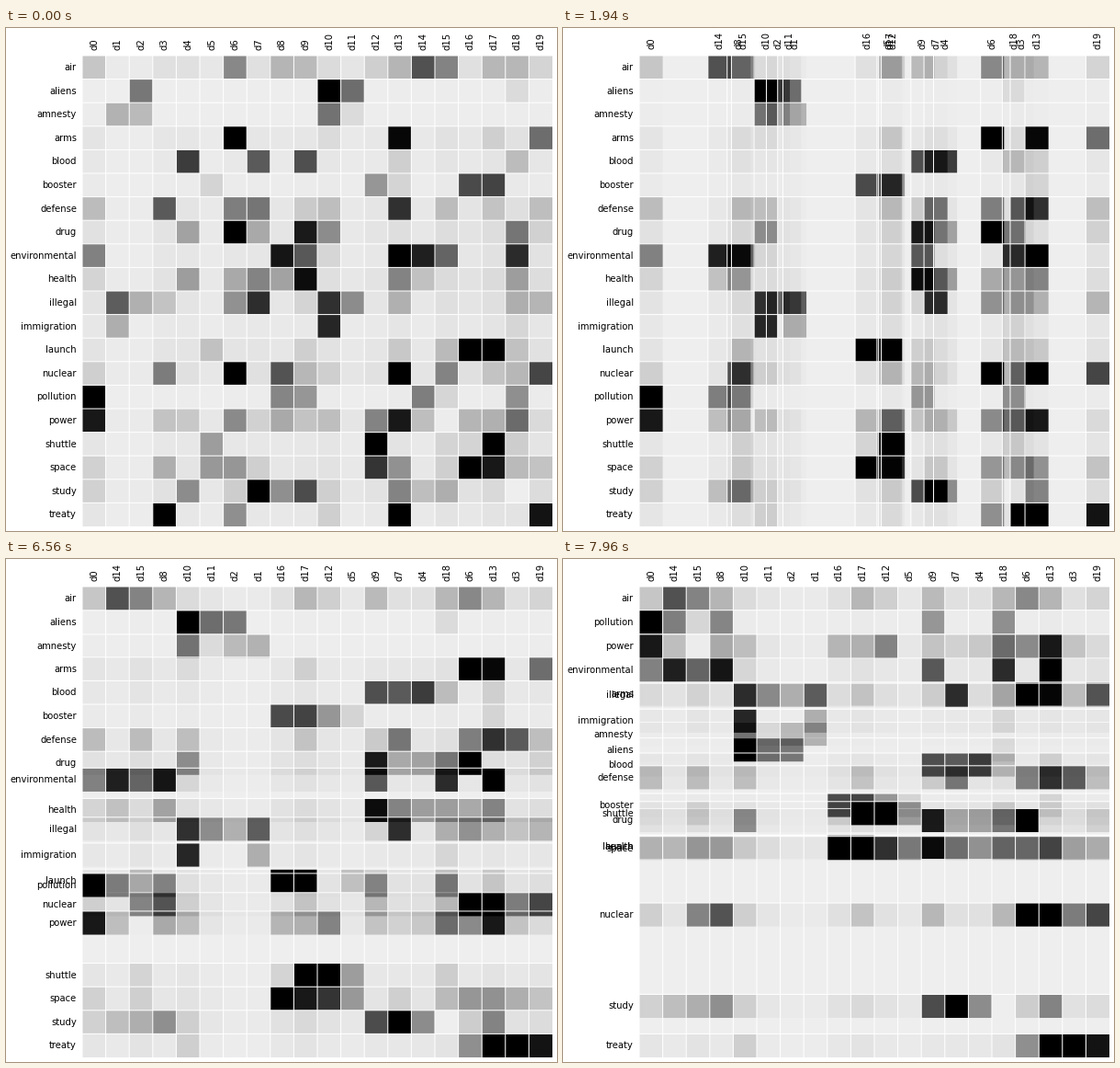
Write a matplotlib script that moves like this. It is 600 px wide and 547 px high and loops after 8 s.

```python
import numpy as np
import matplotlib.pyplot as plt
from matplotlib.animation import FuncAnimation

W, H, DPI = 600, 547, 64
LEFT, TOP, SIDE, N = 83, 30, 512, 20
BAND = SIDE / N
PAPER = 238 / 255
STEP, LOOP = 20, 8000

# Timing in ms: start, first drawn change, length of one move
COL_START, COL_FIRST, COL_LABELS_END = 465, 500, 3050
ROW_START, ROW_FIRST, ROW_DELAY = 5746, 6040, 91
MOVE = 2212

plt.rcParams["font.family"] = "DejaVu Sans"

# How strongly each document picks up the faint background of a term
reach = np.array([1.2, .3, .3, 1, 1, .5, 1, 1, .8, 1,
                  1.3, .6, .9, 1.5, .7, 1.6, 1, 1.6, 1.6, 1.4])
names, weights = [], []


def term(name, faint, **docs):
    """Add a matrix row: a faint base level and its notable cells, in percent."""
    line = faint * reach
    for doc, value in docs.items():
        line[int(doc[1:])] = value
    names.append(name)
    weights.append(line / 100)


term("air", 6, d0=17, d6=43, d8=24, d9=22, d12=13, d13=24, d14=66, d15=45,
     d17=23, d18=23, d19=11)
term("aliens", .5, d2=50, d10=100, d11=54, d18=8)
term("amnesty", .6, d1=25, d2=22, d10=52, d11=8)
term("arms", 3.5, d6=100, d10=8, d13=97, d17=13, d19=54)
term("blood", 2.5, d4=75, d7=62, d9=67, d13=13, d18=21)
term("booster", 1.3, d5=11, d12=37, d13=11, d16=69, d17=72)
term("defense", 4, d0=21, d3=62, d6=47, d7=51, d9=15, d10=20, d13=80, d15=21,
     d17=18, d19=20)
term("drug", 4.5, d4=32, d6=100, d7=29, d9=89, d10=41, d18=51, d19=12)
term("environmental", 3.5, d0=46, d8=91, d9=63, d10=10, d13=100, d14=87,
     d15=58, d18=82)
term("health", 5, d0=11, d4=34, d6=29, d7=45, d8=32, d9=95, d13=45, d14=19,
     d18=34)
term("illegal", 4, d1=61, d2=26, d3=18, d6=39, d7=81, d9=11, d10=80, d11=41,
     d13=26, d18=27, d19=24)
term("immigration", 2.5, d1=27, d10=84, d18=10)
term("launch", 4, d5=19, d9=13, d13=16, d15=22, d16=100, d17=100, d18=19)
term("nuclear", 6, d0=13, d3=48, d6=100, d8=65, d9=23, d10=13, d13=100,
     d15=45, d17=18, d18=23, d19=71)
term("pollution", 1, d0=100, d8=44, d9=37, d14=47, d15=10, d18=40)
term("power", 6, d0=90, d3=18, d4=16, d6=42, d7=12, d8=29, d9=18, d10=20,
     d12=45, d13=90, d14=20, d15=1, d16=24, d17=26, d18=55)
term("shuttle", 3, d5=34, d12=100, d15=11, d16=11, d17=100, d18=14)
term("space", 4, d0=12, d3=27, d5=36, d6=37, d7=13, d12=78, d13=39, d15=13,
     d16=100, d17=90, d18=22, d19=18)
term("study", 5.5, d0=12, d4=41, d6=14, d7=100, d8=40, d9=68, d10=13, d13=45,
     d14=20, d15=27, d18=0)
term("treaty", 3, d3=100, d6=40, d10=13, d13=100, d19=92)
weights = np.array(weights)

doc_order = [0, 14, 15, 8, 10, 11, 2, 1, 16, 17, 12, 5, 9, 7, 4, 18, 6, 13, 3, 19]
term_order = """air pollution power environmental illegal immigration amnesty
    aliens shuttle space launch booster health drug blood study defense nuclear
    arms treaty""".split()

home = np.arange(N)
col_goal = np.argsort(doc_order)
row_goal = np.array([term_order.index(name) for name in names])


def ease(t):
    """Cubic in and out."""
    t = np.clip(t, 0, 1)
    return np.where(t < .5, 4 * t ** 3, 1 - 4 * (1 - t) ** 3)


def held(ms, first):
    """Motion is drawn in steps of 40 ms."""
    return first + (ms - first) // 40 * 40


def column_slots(ms):
    if ms < COL_FIRST:
        return home
    t = (held(ms, COL_FIRST) - COL_START) / MOVE
    return home + (col_goal - home) * ease(t)


def row_slots(ms):
    if ms < ROW_FIRST:
        return home
    t = (held(ms, ROW_FIRST) - ROW_START - ROW_DELAY * row_goal) / MOVE
    return home + (row_goal - home) * ease(t)


def cover(start, length, size):
    """Share of each pixel covered by a span."""
    px = np.arange(size)
    return np.clip(np.minimum(px + 1, start + length) - np.maximum(px, start), 0, 1)


def whiten(area, amount):
    area += (1 - area) * amount


across, down = cover(LEFT, SIDE, W), cover(TOP, SIDE, H)


def paint(xs, ys):
    img = 1 - (1 - PAPER) * np.outer(down, across)
    # Light let through by the cells of every row
    light = np.ones((N, W))
    for j, x in enumerate(xs):
        light *= 1 - np.outer(weights[:, j], cover(x, BAND, W))
    for i, y in enumerate(ys):
        lo = int(y) - 2
        part = slice(lo, lo + int(BAND) + 5)
        area = img[part]
        area *= 1 - np.outer(cover(y, BAND, H)[part], 1 - light[i])
        whiten(area, np.outer(cover(y - .5, 1, H)[part], across))
    for x in xs:
        part = slice(int(x) - 2, int(x) + 3)
        whiten(img[:, part], np.outer(down, cover(x - .5, 1, W)[part]))
    gray = np.rint(img * 255).astype(np.uint8)
    return np.repeat(gray[:, :, None], 3, axis=2)


fig = plt.figure(figsize=(W / DPI, H / DPI), dpi=DPI, facecolor="white")
xs = ys = home * BAND
picture = fig.figimage(paint(LEFT + xs, TOP + ys))


def label(text, **style):
    return fig.text(0, 0, text, fontsize=10 * 72 / DPI, color="black",
                    va="baseline", rotation_mode="anchor", **style)


def place(text, x, y):
    text.set_position((x / W, 1 - y / H))


row_labels = [label(name, ha="right") for name in names]
col_labels = [label(f"d{j}", ha="left", rotation=90) for j in home]


def draw(frame):
    ms = frame * STEP
    xs = LEFT + column_slots(ms) * BAND
    ys = TOP + row_slots(ms) * BAND
    picture.set_data(paint(xs, ys))
    lift = 1 if COL_FIRST <= ms < COL_LABELS_END else 0
    for text, x in zip(col_labels, xs):
        place(text, x + BAND / 2 + 3.2, TOP - 6 - lift)
    for text, y in zip(row_labels, ys):
        place(text, LEFT - 6, y + BAND / 2 + 3.2)
    return [picture, *row_labels, *col_labels]


anim = FuncAnimation(fig, draw, frames=LOOP // STEP, interval=STEP,
                     repeat=True, repeat_delay=0, blit=False)
plt.show()
```
